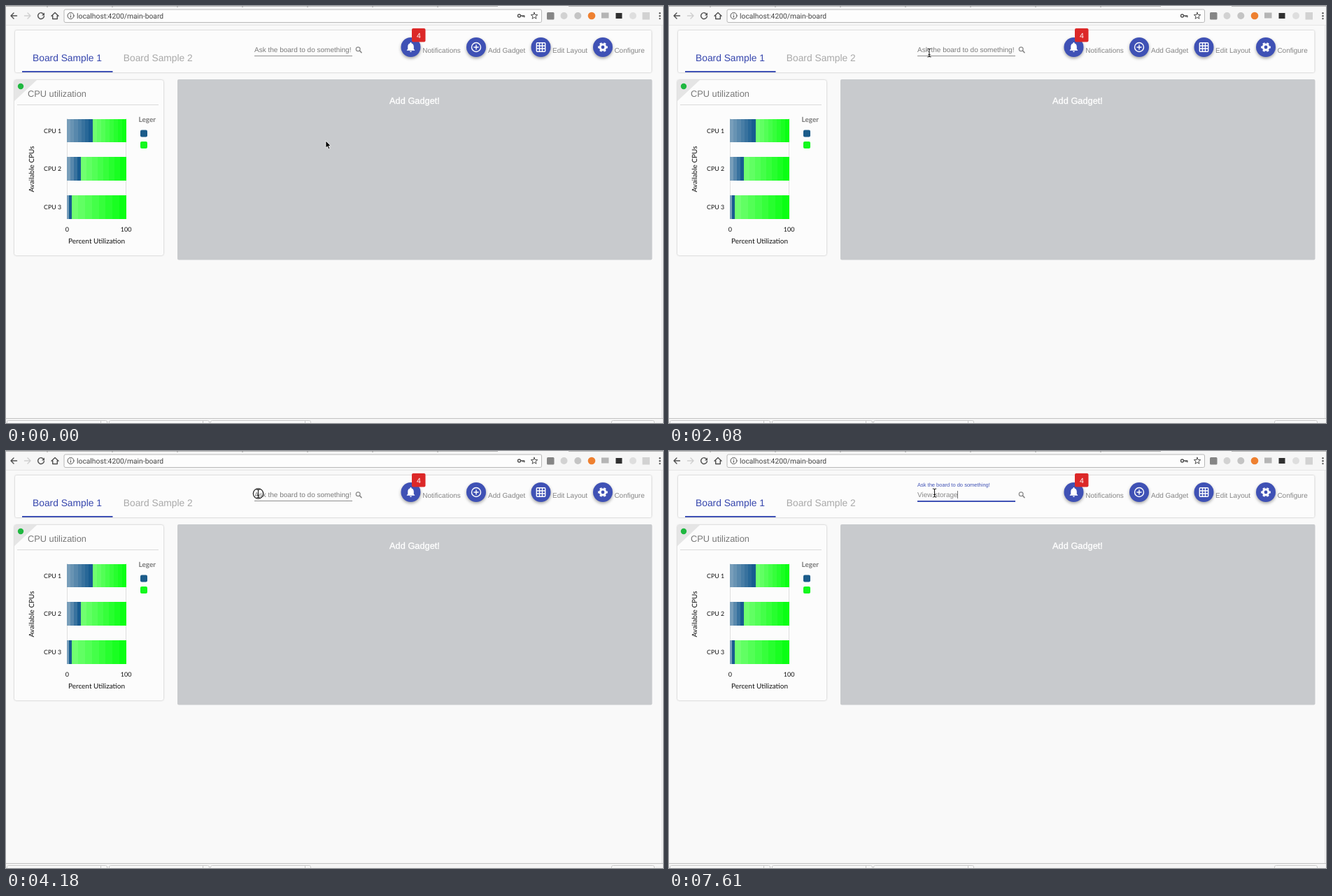
Recreate the animation shown at these times as an HTML page. Size 939 by 597 pixels, loop 8000 ms.

```html
<!DOCTYPE html>
<html lang="en">
<head>
<meta charset="utf-8">
<title>Board</title>
<style>
  html, body { margin: 0; width: 100%; height: 100%; overflow: hidden; background: #f9f9f9; }
  svg { display: block; width: 939px; height: 597px; }
  text { font: 10px "Liberation Sans", Arial, sans-serif; text-rendering: geometricPrecision; white-space: pre; }
  .lato text { font-family: Lato, sans-serif; fill: #111; }
  .line { fill: none; stroke-linecap: round; stroke-linejoin: round; }
  .card { filter: drop-shadow(0 0.5px 1px rgba(0, 0, 0, .28)); }
  .fab { fill: #3f51b5; filter: drop-shadow(0 2px 2px rgba(0, 0, 0, .35)); }
  .mid { text-anchor: middle; }
</style>
</head>
<body>
<svg viewBox="0 0 939 597">
  <rect width="939" height="597" fill="#f9f9f9"/>

  <!-- browser bar -->
  <rect width="939" height="27" fill="#f6f6f6"/>
  <path d="M0 .5H703M804 .5H939" stroke="#b4b4b4"/>
  <path d="M59 0v2M152 0v2M245 0v2M338 0v2M431 0v2M524 0v2M617 0v2" stroke="#999"/>
  <path d="M0 27.5H939" stroke="#e6e6e6"/>
  <rect x="83" y="5" width="682.5" height="18.5" rx="2" fill="#fdfdfd" stroke="#b8b8b8"/>
  <g class="line" stroke="#505050" stroke-width="1.4">
    <path d="M15.500 14H7m4-4-4 4 4 4"/>
    <path d="M26.500 14H35m-4-4 4 4-4 4" stroke="#cfcfcf"/>
    <path d="M53.700 11.600A4.400 4.400 0 1 0 54.400 14.800"/>
    <path d="M55 9.500v4h-4z" fill="#505050" stroke="none"/>
    <path d="M65 14.300 70 9.500l5 4.800M66.700 13.500v5h6.600v-5"/>
    <circle cx="92.500" cy="14" r="4.500" stroke-width="1"/>
    <path d="M92.500 13.700v2.600M92.500 11.600v.1" stroke-width="1.1"/>
    <circle cx="733.500" cy="14" r="2"/>
    <path d="M735.800 14h5v1.700m-2-1.700v1.300"/>
    <path id="star" stroke-width="1"/>
  </g>
  <text x="101" y="17.600" fill="#444" style="font:10.300px Roboto,sans-serif">localhost:4200/main-board</text>
  <rect x="773" y="9" width="10.500" height="10.500" rx="1.500" fill="#858585"/>
  <circle cx="797.500" cy="14" r="5" fill="#d2d2d2"/>
  <circle cx="817.300" cy="14" r="5" fill="#c4c4c4"/>
  <circle cx="837" cy="14" r="5.300" fill="#ee8030"/>
  <rect x="851" y="9.500" width="10.500" height="8" fill="#b5b5b5"/>
  <rect x="871.500" y="10" width="9" height="8" fill="#303030"/>
  <circle cx="896" cy="14" r="5" fill="#dedede"/>
  <rect x="909.500" y="9" width="10.500" height="10.500" fill="#d2d2d2"/>
  <g fill="#555"><circle cx="934.500" cy="10.300" r="1.200"/><circle cx="934.500" cy="14.200" r="1.200"/><circle cx="934.500" cy="18.100" r="1.200"/></g>

  <!-- window edges and download shelf -->
  <path d="M937.500 28V590" stroke="#e6e6e6"/>
  <rect y="590" width="939" height="7" fill="#f5f5f5"/>
  <path d="M0 590.500H939" stroke="#c2c2c2"/>
  <g fill="#fafafa" stroke="#cacaca">
    <rect x="1.500" y="593.500" width="143" height="9" rx="2"/>
    <rect x="147.500" y="593.500" width="143" height="9" rx="2"/>
    <rect x="292.500" y="593.500" width="143" height="9" rx="2"/>
    <rect x="865.500" y="593.500" width="61" height="9" rx="2"/>
    <path d="M135.500 594v4M281.500 594v4M427.500 594v4"/>
  </g>

  <!-- header -->
  <rect class="card" x="13" y="35" width="909.500" height="60" rx="2" fill="#fcfcfc"/>
  <text x="38" y="78.500" fill="#3646ad" style="font-size:13.800px">Board Sample 1</text>
  <text x="167.800" y="79" fill="#a9a9a9" style="font-size:13.800px">Board Sample 2</text>
  <rect x="23" y="93" width="129.500" height="2" fill="#3f51b5"/>
  <path d="M355 71.500H495" stroke="#8f8f8f"/>
  <path id="ripple" d="M355 72H495" stroke="#3f51b5" stroke-width="2"/>
  <text id="label">Ask the board to do something!</text>
  <text id="typed" x="355" y="66" fill="#888"></text>
  <rect id="caret" y="57" width="1" height="11" fill="#777"/>
  <g class="line" stroke="#888" stroke-width="1.200"><circle cx="503.200" cy="61.700" r="2.900"/><path d="M505.500 64l2.500 2.600" stroke-width="1.600"/></g>

  <circle class="fab" cx="578.500" cy="59" r="14"/>
  <circle class="fab" cx="672" cy="59" r="14"/>
  <circle class="fab" cx="764.500" cy="59" r="14"/>
  <circle class="fab" cx="853" cy="59" r="14"/>
  <path transform="translate(570 50.300) scale(.71)" fill="#fff" d="M12 22c1.100 0 2-.9 2-2h-4c0 1.100.9 2 2 2zm6-6v-5c0-3.070-1.640-5.640-4.500-6.320V4c0-.83-.67-1.500-1.500-1.500s-1.500.67-1.500 1.500v.68C7.630 5.360 6 7.920 6 11v5l-2 2v1h16v-1l-2-2z"/>
  <g fill="none" stroke="#fff" stroke-width="1.400">
    <circle cx="672" cy="59" r="6.500"/>
    <path d="M672 55.500v7M668.500 59h7"/>
    <rect x="758.300" y="52.800" width="12.400" height="12.400" rx="1"/>
    <path d="M762.500 53v12M766.500 53v12M758.500 57h12M758.500 61h12"/>
    <circle cx="853" cy="59" r="3.900" stroke-width="3"/>
    <circle cx="853" cy="59" r="6" stroke-width="1.800" pathLength="12" stroke-dasharray="1 1" stroke-dashoffset=".5"/>
  </g>
  <rect x="580" y="32" width="19.500" height="19.500" rx="2" fill="#dc2828"/>
  <text class="mid" x="589.800" y="45.600" fill="#fff" style="font-size:10.500px">4</text>
  <g fill="#858585">
    <text x="595.300" y="67">Notifications</text>
    <text x="689" y="67">Add Gadget</text>
    <text x="781" y="67">Edit Layout</text>
    <text x="869.400" y="67">Configure</text>
  </g>

  <!-- board -->
  <rect x="245" y="105" width="678.500" height="258.500" rx="2" fill="#c8cacd"/>
  <text class="mid" x="584" y="140" fill="#fff" stroke="#fff" stroke-width=".35" style="font-size:12.800px">Add Gadget!</text>

  <!-- gadget -->
  <rect class="card" x="12" y="106" width="213" height="251" rx="3" fill="#fcfcfc"/>
  <path d="M12 106H44L12 136z" fill="#e5e5e5"/>
  <circle cx="21" cy="115" r="4.200" fill="#1fb840"/>
  <text x="31" y="130.300" fill="#787878" style="font-size:12.800px">CPU utilization</text>
  <path d="M16 141.500H218" stroke="#dadada"/>
  <path d="M87.500 161V305M171.500 161V305" stroke="#dedede"/>
  <g id="bars" shape-rendering="crispEdges"></g>
  <g class="lato">
    <g style="font-size:9px">
      <text x="54" y="181.500" style="font-size:8.800px">CPU 1</text>
      <text x="54" y="236" style="font-size:8.800px">CPU 2</text>
      <text x="54" y="290.500" style="font-size:8.800px">CPU 3</text>
      <text class="mid" x="87.300" y="322.700" style="font-size:9px">0</text>
      <text class="mid" x="171.700" y="322.700" style="font-size:9px">100</text>
    </g>
    <text class="mid" x="129.500" y="340">Percent Utilization</text>
    <text class="mid" transform="translate(40 233.500) rotate(-90)">Available CPUs</text>
    <clipPath id="cut"><path d="M189 155h25v15h-25z"/></clipPath>
    <text x="189.500" y="165.700" clip-path="url(#cut)" style="fill:#7a7a7a;font-weight:700">Legend</text>
  </g>
  <rect x="192" y="177.500" width="10" height="10" rx="2" fill="#1b5c8a"/>
  <rect x="192" y="194" width="10" height="10" rx="2" fill="#14f81e"/>

  <!-- pointer -->
  <g id="pointer">
    <path id="arrow" d="M0 0V10.200L2.400 8.100 4.100 12 5.900 11.200 4.200 7.400H7.300z" fill="#000" stroke="#fff" stroke-width=".8"/>
    <path id="beam" class="line" d="M-2.200-6Q0-6 0-4.600Q0-6 2.200-6M0-4.800V4.800M-2.200 6Q0 6 0 4.600Q0 6 2.200 6M-1.200 2.500H1.200" stroke="#222" stroke-width="1.100"/>
    <circle id="ring" r="7.200" fill="none" stroke="#222" stroke-width="1.200"/>
  </g>
</svg>
<script>
  const $ = id => document.getElementById(id);
  const mix = (a, b, k) => a + (b - a) * k;
  const show = (el, on) => el.setAttribute('visibility', on ? 'visible' : 'hidden');
  const LOOP = 8000, FRAME = 87.5, FOCUS = 4220;

  const points = Array.from({ length: 10 }, (_, i) => {
    const r = i % 2 ? 2.1 : 5, a = i * Math.PI / 5;
    return (755 + r * Math.sin(a)).toFixed(2) + ' ' + (14.2 - r * Math.cos(a)).toFixed(2);
  });
  $('star').setAttribute('d', 'M' + points.join('L') + 'z');

  // Each bar segment is a gradient in visible bands.
  function bands(x0, x1, y, from, to, n) {
    let out = '';
    for (let i = 0; i < n; i++) {
      const k = i / (n - 1), w = (x1 - x0) / n;
      const rgb = from.map((c, j) => Math.round(mix(c, to[j], k)));
      out += `<rect x="${x0 + i * w}" y="${y}" width="${w + .3}" height="33.5" fill="rgb(${rgb})"/>`;
    }
    return out;
  }
  $('bars').innerHTML = [[161.5, 123.5], [216, 107], [271, 93.5]].map(([y, x]) =>
    bands(87, x, y, [120, 158, 186], [24, 92, 144], Math.max(2, Math.round((x - 87) / 5))) +
    bands(x, 171.5, y, [112, 255, 112], [10, 255, 20], 8)).join('');

  // time, x, y
  const path = [
    [150, 415, 141], [322, 415, 141], [330, 373, 100], [420, 369, 80], [510, 370, 66],
    [940, 369, 66], [1200, 369, 66], [1550, 399, 94], [1680, 392, 86], [1900, 362, 66],
    [2080, 372, 67], [2950, 435, 66], [3480, 480, 64], [3830, 474, 63],
    [4180, 360.500, 61], [4280, 360.500, 61], [4640, 379.500, 60]
  ];
  function pointerAt(t) {
    if (t < 150) return [457, 193];
    const tick = Math.floor((t - 322) / FRAME);
    const s = tick < 0 ? 150 : 330 + tick * FRAME;
    const i = path.findIndex(p => p[0] > s);
    if (i < 0) return path[path.length - 1].slice(1);
    const a = path[i - 1], b = path[i], k = (s - a[0]) / (b[0] - a[0]);
    return [mix(a[1], b[1], k), mix(a[2], b[2], k)];
  }

  const phrase = 'View storage';
  const keys = [5920, 6100, 6180, 6270, 6450, 6810, 6990, 7170, 7260, 7350, 7520, 7610];

  function draw(t) {
    const [x, y] = pointerAt(t), beam = y < 75;
    $('pointer').setAttribute('transform', `translate(${x} ${y})`);
    show($('arrow'), !beam);
    show($('beam'), beam);
    show($('ring'), t >= 4170 && t < 4270);

    const p = Math.min(1, Math.max(0, (t - FOCUS) / 400)), e = 1 - (1 - p) ** 3;
    const label = $('label');
    label.setAttribute('transform', `translate(355 ${mix(66, 51, e)}) scale(${mix(1, .75, e)})`);
    label.setAttribute('fill', `rgb(${[[122, 63], [122, 81], [122, 181]].map(([a, b]) => mix(a, b, e))})`);
    const half = 70 * e;
    $('ripple').setAttribute('d', `M${425 - half} 72H${425 + half}`);
    show($('ripple'), e > 0);

    const count = keys.filter(k => t >= k).length;
    const typed = $('typed');
    typed.textContent = phrase.slice(0, count);
    $('caret').setAttribute('x', Math.round(355 + (count ? typed.getComputedTextLength() - .3 : 0)));
    show($('caret'), count > 0 || (t >= 4270 && t < 4640) || (t >= 5210 && t < 5650));
  }

  const start = performance.now();
  function loop() {
    draw((performance.now() - start) % LOOP);
    requestAnimationFrame(loop);
  }
  loop();
</script>
</body>
</html>
```
